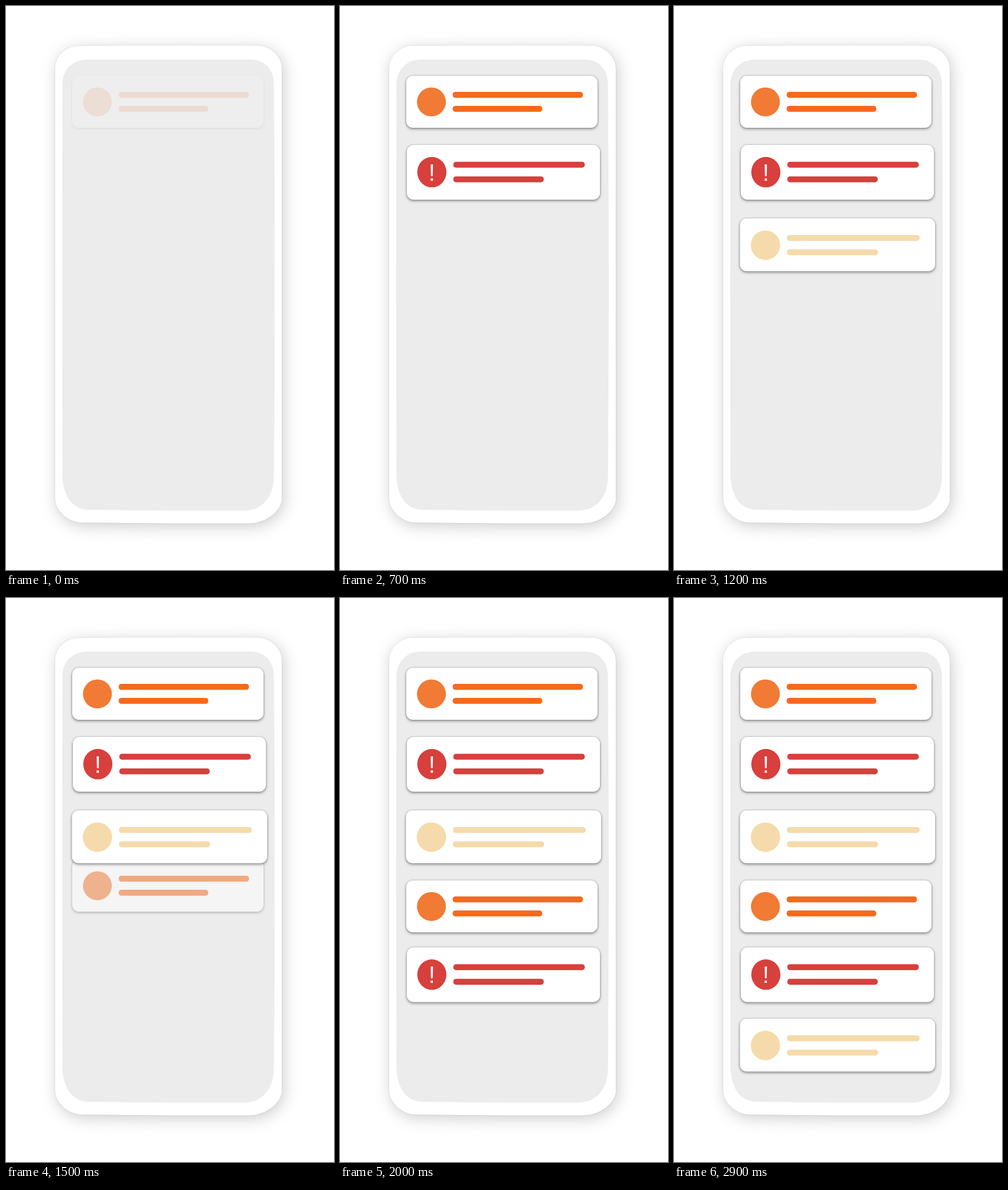
Recreate the animation shown at these times as an HTML page. Size 540 px wide and 926 px high, loop 3 s.

```html
<!DOCTYPE html>
<html lang="en">
<head>
<meta charset="utf-8">
<title>Notification list</title>
<style>
  html, body { margin: 0; width: 100%; height: 100%; overflow: hidden; background: #fff; }
  svg { display: block; width: 540px; height: 926px; }
  .body { fill: #fff; filter: drop-shadow(0 0 1px #0002) drop-shadow(3px 5px 13px #0003); }
  .panel { filter: drop-shadow(0 0 1px #0004) drop-shadow(0 2px 2px #0006); }
  text { font: 39px "Liberation Sans", Arial, sans-serif; text-anchor: middle; fill: #fff; }
</style>
</head>
<body>
<svg viewBox="0 0 540 926">
  <path class="body" d="M118 65.5 Q265 64 415 65 C435 66 454 82 454 103 V812 C450 832 427 849 400 849.5 Q260 850 122 848 C102 847 82 829 81 810 V101 C82 81 99 66 118 65.5Z"/>
  <path fill="#ececec" d="M133 88 H404 C426 88 441 104 441 128 Q444 450 441 775 C440 805 424 828 392 828.5 Q260 829 134 827 C108 826 94 803 93 772 Q92 450 93 124 C95 104 110 88 133 88Z"/>
  <g id="cards"></g>
</svg>
<script>
const LOOP = 3000, STEP = 100, FADE = 220;

// Geometry is relative to the top of each card.
const orange = { x: 109, w: 315, h: 85.5, cx: 150.5, cy: 43, rx: 23.8, ry: 23.8,
  barX: 185.5, long: 214.5, short: 147.5, bars: [26.5, 49.5], disc: '#f17a35', bar: '#f56a1c' };
const red = { x: 110, w: 318, h: 90, cx: 151.2, cy: 44.8, rx: 24, ry: 25,
  barX: 186.5, long: 216.5, short: 149, bars: [27.7, 51.7], disc: '#d7403c', bar: '#d7403c', mark: true };
const cream = { x: 108.5, w: 321.5, h: 87, cx: 150.5, cy: 44.2, rx: 24.2, ry: 24.2,
  barX: 186, long: 218.5, short: 150, bars: [27.5, 51], disc: '#f5dbab', bar: '#f5dbab' };

const cards = [
  { kind: orange, y: 114.5, start: -27, slide: 0 },
  { kind: red, y: 228, start: 455, slide: 52 },
  { kind: cream, y: 348.5, start: 930, slide: 52 },
  { kind: orange, y: 463.5, start: 1390, slide: 68 },
  { kind: red, y: 573.5, start: 1745, slide: 68 },
  { kind: cream, y: 690.5, start: 2280, slide: 68 },
];

function cardMarkup(k) {
  const bar = (y, w) =>
    `<rect x="${k.barX}" y="${y}" width="${w}" height="9.7" rx="4.5" fill="${k.bar}"/>`;
  return `<rect class="panel" x="${k.x}" width="${k.w}" height="${k.h}" rx="11" fill="#fff"/>
    <ellipse cx="${k.cx}" cy="${k.cy}" rx="${k.rx}" ry="${k.ry}" fill="${k.disc}"/>
    ${bar(k.bars[0], k.long)}${bar(k.bars[1], k.short)}
    ${k.mark ? `<text x="${k.cx}" y="58.5">!</text>` : ''}`;
}

// The lower cards slide out from behind the upper ones.
const layer = document.getElementById('cards');
for (const i of [5, 4, 3, 0, 1, 2]) {
  const g = document.createElementNS('http://www.w3.org/2000/svg', 'g');
  g.innerHTML = cardMarkup(cards[i].kind);
  cards[i].node = layer.appendChild(g);
}

function draw() {
  const t = Math.floor(performance.now() % LOOP / STEP) * STEP;
  for (const { node, y, start, slide } of cards) {
    const p = Math.min(1, Math.max(0, (t - start) / FADE));
    node.setAttribute('opacity', p);
    node.setAttribute('transform', `translate(0 ${y - slide * (1 - p)})`);
  }
  requestAnimationFrame(draw);
}
draw();
</script>
</body>
</html>
```
